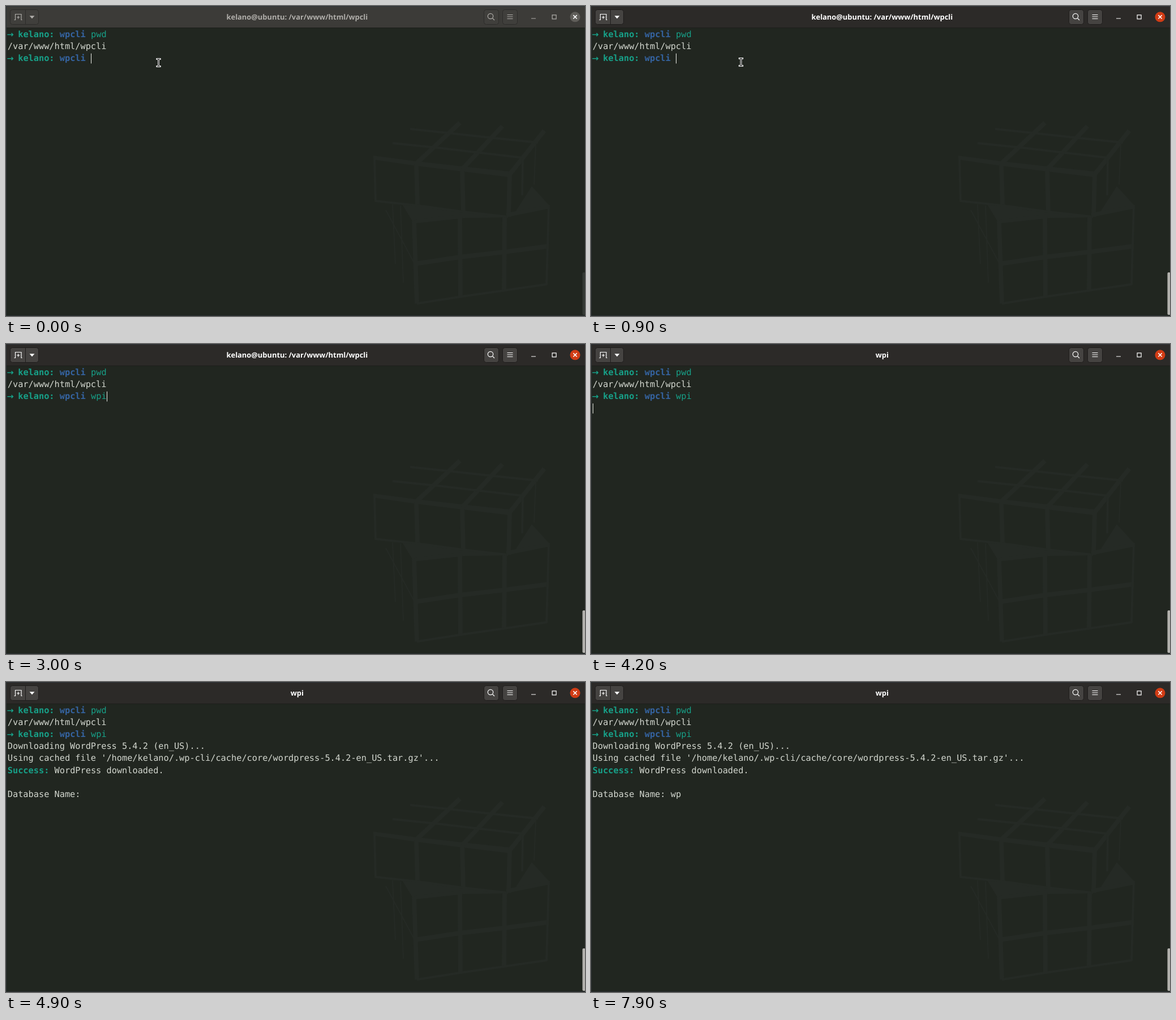
These frames come from a looping animation (1023x547 px, 8000 ms). An HTML page:

```html
<!DOCTYPE html>
<html lang="en">
<head>
<meta charset="utf-8">
<title>Terminal</title>
<style>
  html, body { margin: 0; width: 100%; height: 100%; overflow: hidden; background: #212620; }
  svg { display: block; width: 100vw; height: 100vh; }
  text { white-space: pre; text-rendering: geometricPrecision; }
  .mono { font: 15.28px "DejaVu Sans Mono", monospace; fill: #d3d7cf; }
  .bold { font-weight: bold; }
  .teal { fill: #17a088; }
  .blue { fill: #3564a2; }
  #title { font: bold 12.9px "Noto Sans", "Open Sans", sans-serif; text-anchor: middle; fill: var(--ink); }
  #window { --bar: #2c2a28; --button: #454341; --rim: #1f1d1c; --ink: #fff; --close: #d13c15; --thumb: #b3b2ae; }
  #window.idle { --bar: #3c3b38; --button: #403f3c; --rim: #2d2c2a; --ink: #b0aeaa; --close: #5f5d59; --thumb: #343934; }
  .button { fill: var(--button); stroke: var(--rim); }
  .icon { fill: none; stroke: var(--ink); stroke-width: 1.2; }
  #cube { fill: none; stroke: #252a25; stroke-linejoin: round; }
  #cube .face { fill: #252a25; stroke: none; }
</style>
</head>
<body>
<svg id="window" viewBox="0 0 1023 547">
  <rect width="1023" height="547" fill="#212620"/>

  <g id="cube">
    <path class="face" d="M649 264L725 274 806 283 890 292V302L806 292 725 282 649 271ZM700 350L808 362 887 373 810 374 720 383ZM929 318L960 352 900 363Z"/>
    <path stroke-width="8" d="M725 278L802 206M806 288L877 212M890 297L951 220M725 278L727 352M806 288L808 364M890 297L888 372M721 380L726 525M802 372L803 513M881 372L880 502M722 455L802 443 880 434 957 424"/>
    <path stroke-width="4" d="M683 242L762 250 838 259 915 268M714 217L790 225 862 233 940 241M651 268L653 344 727 352 808 363 887 372M913 270L912 334M726 525L803 513 880 502 955 491 959 351"/>
    <path stroke-width="7" d="M722 380L806 371M884 369L959 354"/>
    <path stroke-width="2" d="M671 360L722 455M683 350L688 455M697 352L702 488M936 243L933 315"/>
  </g>

  <rect width="1023" height="38" fill="var(--bar)"/>
  <path d="M0 .5H1023" stroke="#30353a"/>
  <path d="M0 38.5H1023" stroke="#1d1e1b"/>
  <path d="M.5 0V547M0 546.5H1023" stroke="#2a3033"/>

  <rect class="button" x="7.5" y="6.5" width="50" height="26" rx="4"/>
  <path d="M34.5 7V32" stroke="var(--rim)"/>
  <rect class="button" x="844.5" y="6.5" width="26" height="26" rx="4"/>
  <rect class="button" x="877.5" y="6.5" width="26" height="26" rx="4"/>
  <path class="icon" d="M14.5 24.5H16.5V14.5H27V24.5H28.5M21.7 17.5V22.5M19.2 20H24.2"/>
  <path fill="var(--ink)" d="M41.5 17.2H50.5L46 22.2Z"/>
  <circle class="icon" cx="856" cy="18" r="4.7"/>
  <path class="icon" d="M859.4 21.4L863 25M885.5 15.5H895.5M885.5 19H895.5M885.5 22.5H895.5M928 22H936M965.1 15.9H972.1V22.9H965.1Z"/>
  <circle cx="1005.5" cy="19.3" r="9" fill="var(--close)"/>
  <path stroke="#fff" stroke-width="1.5" d="M1002.3 16.1L1008.7 22.5M1008.7 16.1L1002.3 22.5"/>
  <text id="title" x="514.4" y="23.7"></text>

  <rect x="1018.5" y="470" width="5" height="75" rx="2" fill="var(--thumb)"/>

  <g id="screen"></g>
  <rect id="cursor" width="1" height="17.7" fill="#eef0ea"/>
  <g id="pointer">
    <path id="beam" fill="none" d="M-2.6 -6.5H-1L0 -5.8 1 -6.5H2.6M0 -5.8V5.8M-2.6 6.5H-1L0 5.8 1 6.5H2.6"/>
    <use href="#beam" stroke="#f4f4f4" stroke-width="3" stroke-linecap="square"/>
    <use href="#beam" stroke="#111" stroke-width="1.1"/>
  </g>
</svg>
<script>
const LOOP = 8000;
const LEFT = 2.8, CELL = 9.2, LINE = 21.12, BASELINE = 55, CURSOR_TOP = 41.5;
const USER = "kelano";
const $ = id => document.getElementById(id);
const svg = (name, attrs, parent) => {
  const node = document.createElementNS("http://www.w3.org/2000/svg", name);
  for (const key in attrs) node.setAttribute(key, attrs[key]);
  return parent.appendChild(node);
};

function write(row, col, string, style = "") {
  const node = svg("text", {
    class: "mono " + style, x: LEFT + col * CELL, y: BASELINE + row * LINE
  }, $("screen"));
  node.textContent = string;
  return node;
}

function prompt(row, command) {
  const y = BASELINE + row * LINE - 4.5;
  svg("path", {
    d: `M2.3 ${y}H12.3M9.6 ${y - 2.6}L12.3 ${y} 9.6 ${y + 2.6}`,
    fill: "none", stroke: "#17a088", "stroke-width": 1.5
  }, $("screen"));
  write(row, 2, USER + ":", "bold teal");
  write(row, 10, "wpcli", "bold blue");
  return write(row, 16, command, "teal");
}

prompt(0, "pwd");
write(1, 0, "/var/www/html/wpcli");
const command = prompt(2, "");
const download = [
  write(3, 0, "Downloading WordPress 5.4.2 (en_US)..."),
  write(4, 0, `Using cached file '/home/${USER}/.wp-cli/cache/core/wordpress-5.4.2-en_US.tar.gz'...`)
];
const result = [
  write(5, 0, "Success:", "bold teal"),
  write(5, 9, "WordPress downloaded."),
  write(7, 0, "Database Name:")
];
const answer = write(7, 15, "");

const show = (node, visible) => node.setAttribute("visibility", visible ? "visible" : "hidden");
const typed = (string, times, t) => string.slice(0, times.filter(at => t >= at).length);

// Each entry is [start, row, column]; entries without a cell are the blink's dark phase.
const cursorSteps = [
  [0, 2, 16], [1300], [1800, 2, 17], [2500, 2, 18], [3000, 2, 19],
  [3500, 3, 0], [3600], [4200, 3, 0], [4300, 5, 0], [4800],
  [5400, 7, 15], [6000], [6600, 7, 15], [7300, 7, 17], [7900]
];
const pointerSteps = [[0, 269.5, 100], [200, 266, 100], [500, 265, 99], [1800]];
const stepAt = (steps, t) => steps.filter(step => t >= step[0]).pop();

function render(t) {
  $("window").setAttribute("class", t < 900 ? "idle" : "");
  $("title").textContent = t < 3600 ? USER + "@ubuntu: /var/www/html/wpcli" : "wpi";
  command.textContent = typed("wpi", [1800, 2500, 3000], t);
  answer.textContent = t >= 7300 ? "wp" : "";
  download.forEach(node => show(node, t >= 4300));
  result.forEach(node => show(node, t >= 4900));

  const [, row, col] = stepAt(cursorSteps, t);
  show($("cursor"), row !== undefined);
  if (row !== undefined) {
    $("cursor").setAttribute("x", Math.round(LEFT + col * CELL));
    $("cursor").setAttribute("y", CURSOR_TOP + row * LINE);
  }

  const [, x, y] = stepAt(pointerSteps, t);
  show($("pointer"), x !== undefined);
  if (x !== undefined) $("pointer").setAttribute("transform", `translate(${x} ${y})`);
}

const start = performance.now();
function tick() {
  render((performance.now() - start) % LOOP);
  requestAnimationFrame(tick);
}
tick();
</script>
</body>
</html>
```
